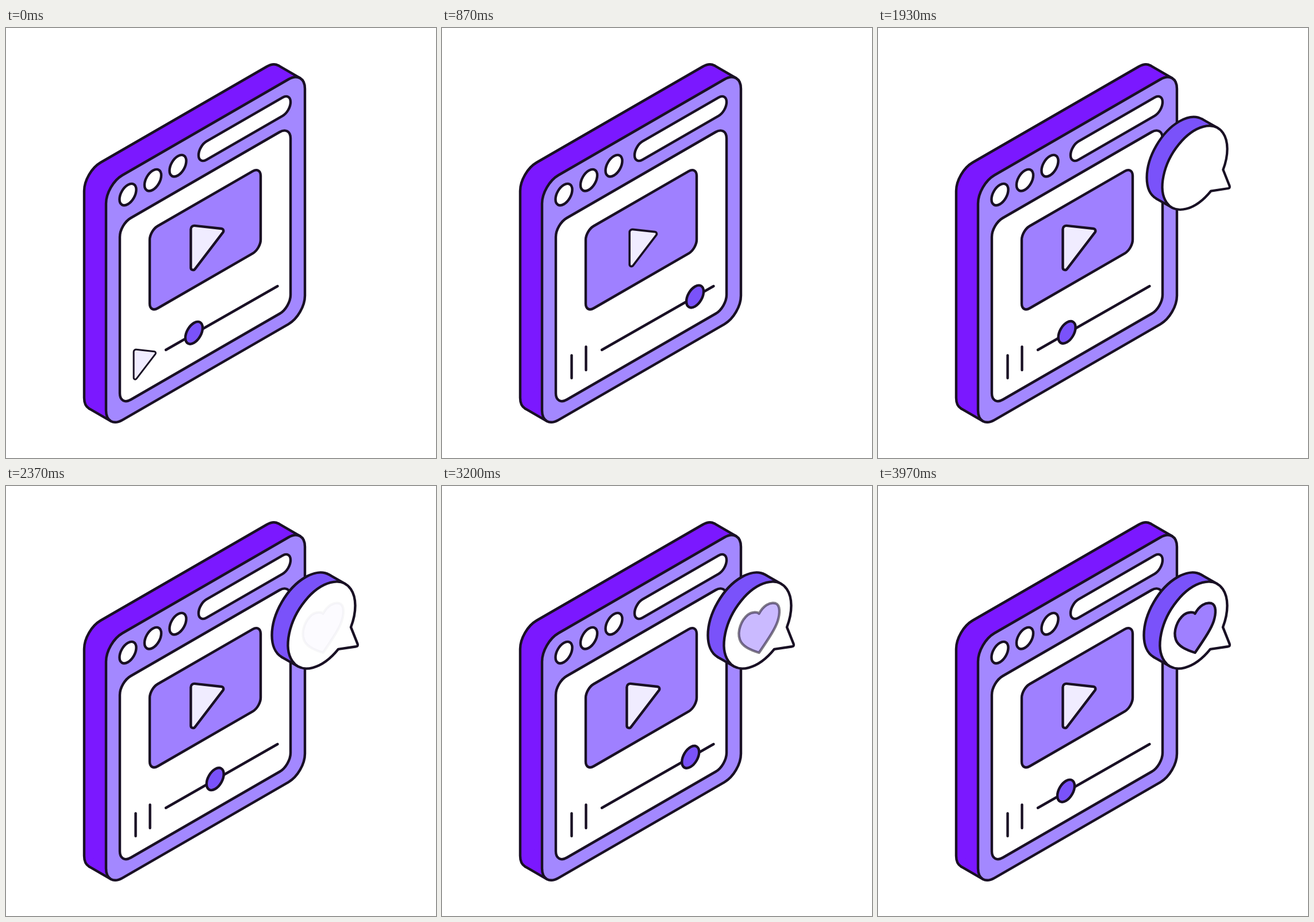
Animation, 748 px wide and 748 px high, one loop 4 s. Source, as an HTML page with a canvas:

```html
<!DOCTYPE html>
<html lang="en">
<head>
<meta charset="utf-8">
<title>Video window</title>
<style>
  html, body { margin: 0; width: 100%; height: 100%; overflow: hidden; background: #fff; }
  canvas { display: block; width: 748px; height: 748px; }
</style>
</head>
<body>
<canvas id="stage" width="748" height="748"></canvas>
<script>
const ctx = document.getElementById('stage').getContext('2d');
const LOOP = 4000;
const STROKE = 4.4;
const COS = Math.cos(Math.PI / 6);
const INK = '#191024', DEEP = '#7b18ff', FACE = '#a388ff', PANEL = '#9f80ff';
const ACCENT = '#7a52fa', PALE = '#f0ecff', WHITE = '#fff';

const clamp = v => Math.min(1, Math.max(0, v));
const span = (t, a, b) => clamp((t - a) / (b - a));
const ease = u => u * u * (3 - 2 * u);

// Path built in the isometric plane with its origin at (x, y).
function iso(x, y, build) {
  const flat = new Path2D(), path = new Path2D();
  build(flat);
  path.addPath(flat, new DOMMatrix([COS, -0.5, 0, 1, x, y]));
  return path;
}
const isoRect = (x, y, w, h, r) => iso(x, y, p => p.roundRect(0, 0, w / COS, h, r));
const isoDisc = (x, y, r) => iso(x, y, p => p.arc(0, 0, r, 0, Math.PI * 2));

function paint(path, fill) {
  ctx.fillStyle = fill;
  ctx.fill(path);
  ctx.lineWidth = STROKE;
  ctx.stroke(path);
}

function line(x1, y1, x2, y2) {
  ctx.lineWidth = STROKE;
  ctx.beginPath();
  ctx.moveTo(x1, y1);
  ctx.lineTo(x2, y2);
  ctx.stroke();
}

// Side of a solid: the back outline joined to the front at tangent points a and b.
function extrude(path, fill, dx, dy, a, b) {
  ctx.save();
  ctx.translate(-dx, -dy);
  paint(path, fill);
  ctx.restore();
  ctx.fillStyle = fill;
  ctx.beginPath();
  ctx.moveTo(a[0] - dx, a[1] - dy);
  ctx.lineTo(a[0], a[1]);
  ctx.lineTo(b[0], b[1]);
  ctx.lineTo(b[0] - dx, b[1] - dy);
  ctx.fill();
  for (const [x, y] of [a, b]) line(x - dx, y - dy, x, y);
}

function scaled(x, y, s, draw) {
  ctx.save();
  ctx.translate(x, y);
  ctx.scale(s, s);
  draw();
  ctx.restore();
}

const body = isoRect(174, 272.5, 346, 425.8, 33);
const screen = isoRect(198, 341.5, 297, 316, 22);
const video = isoRect(250, 352.5, 193, 143, 16);
const bar = isoRect(335, 205.2, 160, 32, 16);
const lights = [0, 1, 2].map(i => isoDisc(212 + 43.5 * i, 289.7 - 25 * i, 16.8));
const knob = isoDisc(0, 0, 17.3);

const triangle = new Path2D();
triangle.moveTo(-28.3, 0);
triangle.arcTo(-28.3, -39.6, 32, -33, 6);
triangle.arcTo(32, -33, -28.3, 46, 4);
triangle.arcTo(-28.3, 46, -28.3, 0, 4);
triangle.closePath();

const BX = 549, BY = 242, BR = 67.5;
const disc = isoDisc(BX, BY, BR);
const bubble = iso(BX, BY, p => p.arc(0, 0, BR, 1.052, 0.511 + Math.PI * 2));
bubble.lineTo(611.5, 274.5);
bubble.quadraticCurveTo(613, 278.5, 609, 279.2);
bubble.closePath();

const heart = new Path2D(`M551.5 222 C559 208 570 201.5 580 204
  C589 207 588 222 584 235 C580 247 572 260 551.5 290
  C536 285 522 279 518 267 C513 252 521 233 532 224
  C540 218.5 549 219 551.5 222 Z`);

function drawWindow() {
  extrude(body, DEEP, 38, 22, [511.6, 87.2], [182.4, 683.9]);
  paint(body, FACE);
  for (const light of lights) paint(light, WHITE);
  paint(bar, WHITE);
  paint(screen, WHITE);
  paint(video, PANEL);
}

function knobPlace(t) {
  if (t >= 3000) return 1 - ease(span(t, 3000, 3967));
  const u = t % 2000 / 1000;
  return ease(u < 1 ? u : 2 - u);
}

function drawPlayer(t) {
  const press = t < 750 ? ease(t / 750) : 1 - ease(span(t, 750, 1500));
  scaled(349.8, 382.8, 1 - 0.18 * press, () => paint(triangle, PALE));

  const swap = span(t, 200, 500);
  ctx.globalAlpha = 1 - swap;
  scaled(241.2, 585.5, 0.675, () => paint(triangle, PALE));
  ctx.globalAlpha = swap;
  line(225.5, 569.5, 225.5, 609);
  line(250.5, 554.5, 250.5, 595);
  ctx.globalAlpha = 1;

  line(278, 560, 472.5, 449);
  const k = knobPlace(t);
  scaled(327 + 118.5 * k, 530.3 - 66.3 * k, 1, () => paint(knob, ACCENT));
}

function drawBubble(t) {
  const grow = ease(span(t, 1100, 2035));
  if (!grow) return;
  const c = BR * Math.SQRT1_2, ox = c * COS, oy = c * 1.5;
  scaled(610, 274, grow, () => {
    ctx.translate(-610, -274);
    extrude(disc, ACCENT, 28, 16, [BX + ox, BY - oy], [BX - ox, BY + oy]);
    paint(bubble, WHITE);
    ctx.globalAlpha = Math.pow(span(t, 2000, 3540), 2.45);
    paint(heart, PANEL);
  });
}

function frame() {
  const t = performance.now() % LOOP;
  ctx.fillStyle = WHITE;
  ctx.fillRect(0, 0, 748, 748);
  ctx.strokeStyle = INK;
  ctx.lineCap = ctx.lineJoin = 'round';
  drawWindow();
  drawPlayer(t);
  drawBubble(t);
  requestAnimationFrame(frame);
}
frame();
</script>
</body>
</html>
```
